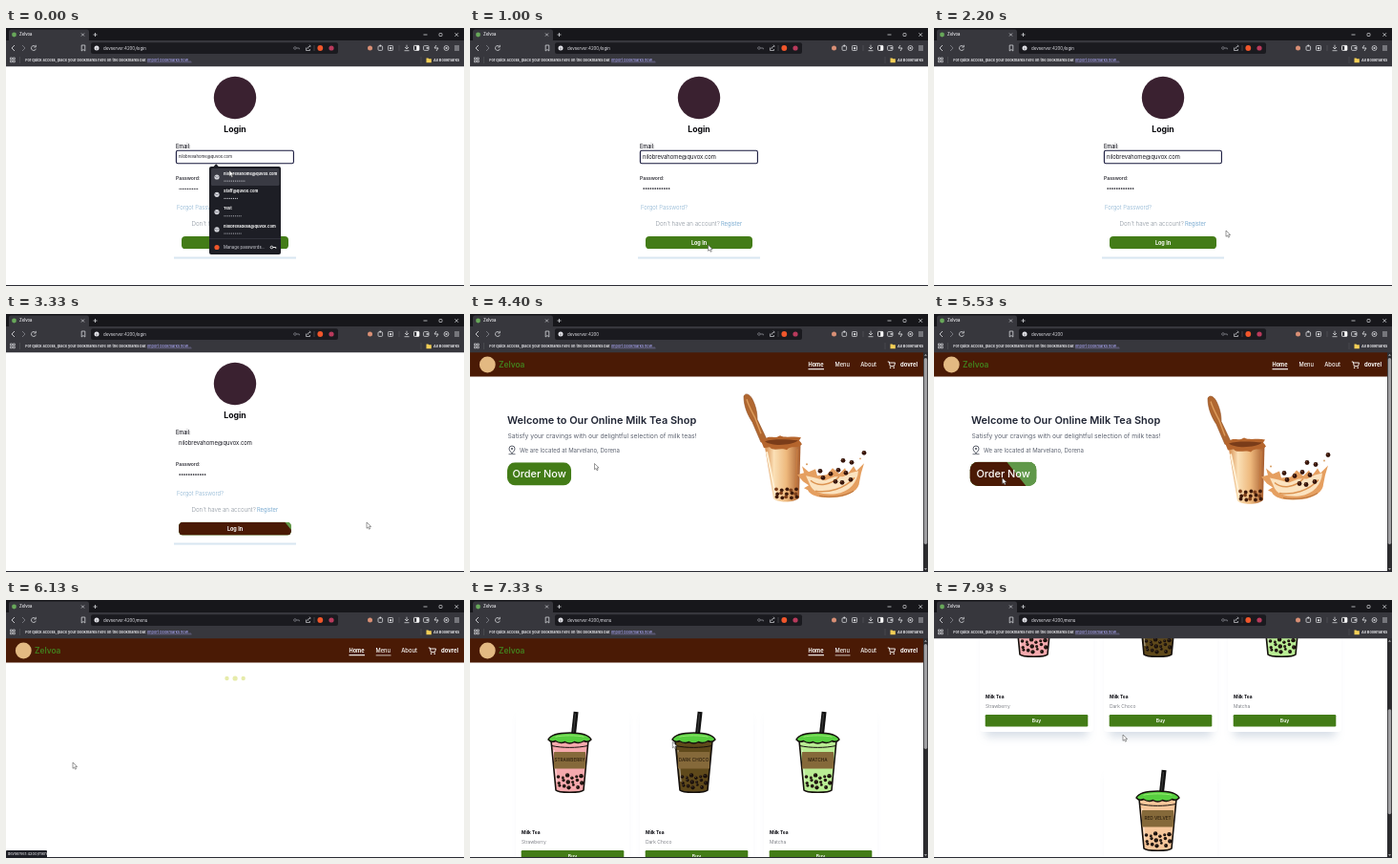
An HTML page with a canvas for the animation above (8000 ms loop, 480 by 270 pixels).

```html
<!DOCTYPE html>
<html lang="en">
<head>
<meta charset="utf-8">
<title>Milk tea shop</title>
<style>
html, body { margin: 0; width: 100%; height: 100%; overflow: hidden; background: #fff; }
canvas { display: block; width: 480px; height: 270px; }
</style>
</head>
<body>
<canvas id="stage"></canvas>
<script>
const LOOP = 8000, HOME_AT = 3670, MENU_AT = 5870, CARDS_AT = 6300;
const BRAND = 'Zelvoa', HOST = 'devserver:4200', USER = 'dovrel';
const EMAIL = 'nilobrevahome@quvox.com';
const GREEN = '#437c17', LIGHT = '#60984a', BROWN = '#4a1a05', INK = '#16161f';
const STRIP = '#17171b', BAR = '#37373d';

const canvas = document.getElementById('stage');
const c = canvas.getContext('2d');
const dpr = window.devicePixelRatio || 1;
canvas.width = 480 * dpr;
canvas.height = 270 * dpr;

const clamp = v => Math.max(0, Math.min(1, v));
const smooth = v => { v = clamp(v); return v * v * (3 - 2 * v); };
const ramp = (t, from, to, d = 300) => smooth((t - from) / d) * (1 - smooth((t - to) / d));

function rect(x, y, w, h, fill, r = 0) {
  c.beginPath();
  c.roundRect(x, y, w, h, r);
  c.fillStyle = fill;
  c.fill();
}

function frame(x, y, w, h, color, r = 0, width = 0.8) {
  c.beginPath();
  c.roundRect(x, y, w, h, r);
  c.strokeStyle = color;
  c.lineWidth = width;
  c.stroke();
}

function dot(x, y, r, fill) {
  c.beginPath();
  c.arc(x, y, r, 0, 7);
  c.fillStyle = fill;
  c.fill();
}

function ring(x, y, r, color, from = 0, to = 7) {
  c.beginPath();
  c.arc(x, y, r, from, to);
  c.strokeStyle = color;
  c.lineWidth = 0.8;
  c.stroke();
}

function line(color, width, ...p) {
  c.beginPath();
  for (let i = 0; i < p.length; i += 2) c.lineTo(p[i], p[i + 1]);
  c.strokeStyle = color;
  c.lineWidth = width;
  c.stroke();
}

function path(d, fill, stroke, width = 1) {
  const p = new Path2D(d);
  if (fill) { c.fillStyle = fill; c.fill(p); }
  if (stroke) { c.strokeStyle = stroke; c.lineWidth = width; c.stroke(p); }
}

function text(s, x, y, size, color, weight = 400, align = 'left') {
  c.font = `${weight} ${size}px Inter, "Open Sans", sans-serif`;
  c.textAlign = align;
  c.textBaseline = 'middle';
  c.fillStyle = color;
  c.fillText(s, x, y);
}

function bullets(x, y, n, gap, r, color) {
  for (let i = 0; i < n; i++) dot(x + i * gap, y, r, color);
}

function keyIcon(x, y, color) {
  ring(x - 1.6, y, 1.3, color);
  line(color, 0.9, x - 0.3, y, x + 2.8, y, x + 2.8, y + 1.3);
}

// Browser window
function browser(url) {
  const pale = '#d5d6da', dim = '#7c7d84';
  rect(0, 0, 480, 14, STRIP);
  rect(3, 1.5, 84, 13, BAR, 2.5);
  rect(0, 13, 480, 27.3, BAR);
  dot(8.5, 7, 2.4, '#68a85a');
  text(BRAND, 14, 7.2, 4.2, '#f0f0f4', 500);
  line(pale, 0.7, 79, 5.5, 82, 8.5);
  line(pale, 0.7, 82, 5.5, 79, 8.5);
  line(pale, 0.8, 91.5, 7, 95.5, 7);
  line(pale, 0.8, 93.5, 5, 93.5, 9);
  line(pale, 0.8, 437.5, 7, 441.5, 7);
  frame(454, 5.5, 3, 3, pale, 0.5, 0.7);
  line(pale, 0.8, 470.5, 5.2, 474, 8.8);
  line(pale, 0.8, 474, 5.2, 470.5, 8.8);

  line(pale, 0.9, 9, 18, 6, 21, 9, 24);
  line(dim, 0.9, 17, 18, 20, 21, 17, 24);
  ring(29, 21, 2.5, pale, 0.3, 5.4);
  line(pale, 0.8, 31.3, 17.8, 31.3, 20, 29.2, 20);
  line(pale, 0.8, 79.2, 18, 82.8, 18, 82.8, 24, 81, 22.5, 79.2, 24, 79.2, 18);
  rect(89, 15.3, 259, 11.6, '#1a1a1f', 2);
  dot(95, 21, 2.5, '#e4e4ea');
  rect(94.7, 20.6, 0.6, 1.8, '#222');
  text(url, 102, 21.2, 4.4, '#e6e6ec');
  keyIcon(304.5, 21, dim);
  line(pale, 0.7, 314.5, 20.5, 314.5, 23.5, 318.5, 23.5, 318.5, 22);
  line(pale, 0.7, 316, 22, 316.5, 20, 319.3, 19, 317.8, 17.8);
  line('#5b5c62', 0.6, 323, 18, 323, 24);
  dot(329.3, 21, 2.9, '#f0562b');
  dot(341, 21, 2.6, '#b93a5c');
  dot(381.5, 21, 2.5, '#d98f75');
  frame(390, 18.8, 4.6, 4.6, pale, 1);
  dot(392.3, 18.4, 1, pale);
  frame(400.5, 18.5, 5, 5, pale, 0.8);
  rect(402, 20.2, 2.2, 2, pale);
  line('#5b5c62', 0.6, 412, 18, 412, 24);
  line(pale, 0.8, 420, 17.7, 420, 22);
  line(pale, 0.8, 418, 20, 420, 22, 422, 20);
  line(pale, 0.8, 417.5, 23.7, 422.5, 23.7);
  frame(427.5, 18.4, 5.4, 5, '#fff', 0.8);
  rect(430.2, 18.4, 2.7, 5, '#fff');
  frame(437.6, 18.6, 5.4, 4.8, pale, 1);
  rect(440.5, 20.2, 2.5, 1.5, pale);
  line(pale, 0.9, 451, 18, 449, 21, 453, 21, 451, 24);
  ring(461.5, 21, 2.5, pale);
  dot(461.5, 21, 1, pale);
  for (const y of [19, 21, 23]) line(pale, 0.8, 470, y, 475, y);

  for (const x of [4.5, 7.4]) for (const y of [31, 33.9]) frame(x, y, 1.9, 1.9, pale, 0, 0.7);
  line('#55565c', 0.6, 14.5, 30, 14.5, 37);
  text('For quick access, place your bookmarks here on the bookmarks bar.', 20.3, 33.6, 3.87, '#f0f0f4', 600);
  text('Import bookmarks now...', 148, 33.6, 3.9, '#a9a5f2', 500);
  line('#a9a5f2', 0.4, 148, 35.8, 194.5, 35.8);
  path('M440.5 31.5h2l.7 .8h2.6v4h-5.3z', '#f4cf56');
  line('#55565c', 0.6, 435, 30, 435, 37);
  text('All Bookmarks', 448, 33.6, 3.9, '#f0f0f4', 600);
}

// Button whose brown layer wipes in from the left along a slanted edge
function wipeButton(x, y, w, h, r, k, grow, label, size, weight) {
  c.save();
  c.translate(x + w / 2, y + h / 2);
  c.scale(1 + grow * k, 1 + grow * k);
  c.translate(-w / 2, -h / 2);
  c.beginPath();
  c.roundRect(0, 0, w, h, r);
  c.clip();
  rect(0, 0, w, h, GREEN);
  if (k > 0) {
    c.globalAlpha = clamp(k * 4);
    rect(0, 0, w, h, LIGHT);
    c.globalAlpha = 1;
    const slant = h * 0.4, edge = k * (w + 2 * slant) - slant;
    path(`M-20 0H${edge - slant}L${edge + slant} ${h}H-20z`, BROWN);
  }
  c.restore();
  text(label, x + w / 2, y + h / 2 + 0.3, size, '#fff', weight, 'center');
}

function dropdown() {
  path('M217 145.5l3.2-3.2 3.2 3.2z', '#1d1e25');
  rect(213, 145, 75, 92, '#1d1e25', 2);
  rect(215, 147, 71.5, 18, '#393a43', 1.5);
  const rows = [[EMAIL, 12], ['Staff@quvox.com', 8], ['Test', 10], ['nilobrevadesk@quvox.com', 10]];
  rows.forEach(([name, n], i) => {
    const y = 152.5 + i * 18.3;
    dot(221, y + 3.5, 2.6, '#d3d4da');
    line('#555763', 0.6, 219, y + 2.6, 221, y + 4, 222.6, y + 3);
    text(name, 228, y, 4.1, '#fff', 700);
    bullets(229, y + 7.6, n, 1.9, 0.55, '#cfd0d8');
  });
  line('#3d3e48', 0.6, 213, 220.5, 288, 220.5);
  dot(221, 229.5, 2.6, '#f0562b');
  text('Manage passwords...', 228, 229.6, 4.3, '#d4d5dc');
  keyIcon(280, 229.5, '#fff');
}

function login(t) {
  dot(240, 73, 22.2, '#3a2130');
  text('Login', 240, 106.5, 8.7, '#08080c', 700, 'center');
  text('Email:', 178, 124.3, 5.5, INK, 500);
  if (t < 2870) frame(178.4, 128.2, 123, 13.6, '#17183c', 1.8, 1.1);
  const filled = t >= 70;
  text(EMAIL, 181, 135.1, filled ? 5.85 : 4.25, INK);
  text('Password:', 178, 157.2, 5.1, INK, 500);
  if (filled) bullets(182.2, 168, 12, 2.4, 0.85, INK);
  else bullets(182, 168.3, 12, 1.7, 0.6, INK);
  text('Forgot Password?', 179, 188, 5.9, '#86b0d0', 300);
  text("Don't have an account?", 194.5, 205, 6.15, '#8b949e', 300);
  text('Register', 263, 205, 5.7, '#78aad0', 400);
  const k = Math.max(ramp(t, 1270, 1750), ramp(t, 2500, 3290));
  wipeButton(184, 218, 112, 13.2, 4, k, 0.054, 'Log In', 5.5, 700);
  const g = c.createLinearGradient(0, 238.5, 0, 242.5);
  g.addColorStop(0, 'rgba(214,228,240,0)');
  g.addColorStop(0.5, '#d9e6f1');
  g.addColorStop(1, 'rgba(214,228,240,0)');
  rect(176, 238.5, 128, 4, g);
  const fade = 1 - smooth((t - 70) / 130);
  if (fade > 0) {
    c.globalAlpha = fade;
    dropdown();
    c.globalAlpha = 1;
  }
}

function nav(shift, menuActive) {
  rect(0, 40, 480, 25.6, BROWN);
  dot(18.3, 53, 8.4, '#e3b982');
  text(BRAND, 30, 53.3, 8.4, '#427f1d', 600);
  c.save();
  c.translate(shift, 0);
  text('Home', 354.5, 53, 5.6, '#fff', 700);
  line('#fff', 1.1, 354.5, 57.7, 371, 57.7);
  text('Menu', 382.5, 53.2, 5.7, '#fff', 500);
  if (menuActive) line('#fff', 0.7, 382.7, 57.9, 398.5, 57.9);
  text('About', 409.2, 53.2, 5.8, '#fff', 500);
  line('#fff', 0.9, 437.8, 50, 439.3, 50, 440.3, 54.6, 444.5, 54.6, 445.5, 51, 439.5, 51);
  dot(440.6, 56.3, 0.8, '#fff');
  dot(444.2, 56.3, 0.8, '#fff');
  text(USER, 451, 53.2, 5.9, '#fff', 700);
  c.restore();
}

function scrollbar(y, h) {
  rect(475, 40, 5, 230, '#2c2c2f');
  rect(475.8, y, 3.4, h, '#a0a0a3', 1.7);
  path('M477.5 41.8l1.5 2h-3z', '#a0a0a3');
  path('M477.5 268l1.5-2h-3z', '#a0a0a3');
}

function drink(dy) {
  c.save();
  c.translate(0, dy);
  const tea = c.createLinearGradient(309, 0, 347, 0);
  tea.addColorStop(0, '#d58b4c');
  tea.addColorStop(0.25, '#fbe0b6');
  tea.addColorStop(0.6, '#edb87c');
  tea.addColorStop(1, '#a4592b');
  // Spoon
  path('M287 85C288 81 293 82 296 88C300 96 301 103 301 109L311 130L305 133L296 112C290 103 287 94 287 85z', '#b06730', '#8d4a1e', 0.6);
  path('M290 88C292 95 296 102 299 108L305 124', null, '#dc9c5c', 1.4);
  // Cup
  path('M308.5 135L346.5 133L345 191C342 196 323 197 318 192z', tea);
  path('M311 143L320 187', null, '#fff0d5', 2);
  path('M343 140L341 186', null, '#c57c42', 1.5);
  path('M304 129L309 130C313 125 319 130 325 126C331 129 339 126 347 128L345 131L348 135C342 141 337 135 332 141C326 138 318 143 314 138L308 139z', '#b5652d');
  path('M309 132C318 129 333 130 344 131C338 136 317 138 309 132z', '#7a3c19');
  for (let i = 0; i < 15; i++) {
    dot(321 + (i % 5) * 5.1 + (i * 7 % 3) * 0.6, 182 + Math.floor(i / 5) * 4 + (i % 2), 1.9, i % 3 ? '#3d1a0b' : '#7d401c');
  }
  // Splash
  path('M343 167L350 165L348 158L355 164L362 161L364 168L374 167L380 160L387 166L393 160L396 166L402 158L405 163L413 155L410 165L408 175C408 181 400 189 385 190.5C370 192 357 190 354 183L350 181L355 178L349 174z', '#e59f60');
  path('M352 168L361 170L372 173L382 169L391 169L399 165L407 163C406 175 398 185 383 187C369 188 360 185 357 179z', '#fbe3c0');
  path('M357 173C365 180 378 178 387 169M362 184C376 186 392 182 403 170', null, '#dc9452', 1.5);
  path('M366 189C378 191 392 190 402 184', null, '#b8733c', 1);
  const pearls = [413, 144, 391, 152, 400, 154, 386, 162, 394, 165, 378, 166, 370, 170, 383, 174, 399, 172, 367, 163, 390, 175];
  for (let i = 0; i < pearls.length; i += 2) {
    dot(pearls[i], pearls[i + 1], 2.4, '#35150b');
    dot(pearls[i] - 0.7, pearls[i + 1] - 0.8, 0.6, '#9b6044');
  }
  dot(409, 150, 0.9, '#d79a5e');
  dot(353, 156, 1, '#d79a5e');
  c.restore();
}

function home(t) {
  nav(0, false);
  text('Welcome to Our Online Milk Tea Shop', 39, 111.5, 10.95, '#1f2433', 600);
  text('Satisfy your cravings with our delightful selection of milk teas!', 39.5, 128.3, 6.77, '#5d6370', 400);
  path('M44 146C41.8 143.3 41 142.2 41 141A3 3 0 0 1 47 141C47 142.2 46.2 143.3 44 146z', null, '#333947', 0.8);
  dot(44, 141, 0.9, '#333947');
  line('#333947', 0.7, 40.5, 146.7, 47.5, 146.7);
  text('We are located at Marvelano, Dorena', 52, 143, 6, '#5d6370');
  const k = Math.max(ramp(t, 4550, 4790), ramp(t, 5350, LOOP));
  wipeButton(39, 155.3, 67.2, 24.2, 8.2, k, 0.06, 'Order Now', 10.9, 500);
  drink(25.5 * (0.5 + 0.5 * Math.cos((t - 5000) / 1400 * 2 * Math.PI)));
  scrollbar(46, 195);
}

const MENU = [
  ['Strawberry', '#f5a9ad', 0, 0],
  ['Dark Choco', '#5f491b', 1, 0],
  ['Matcha', '#b9ec94', 2, 0],
  ['Red Velvet', '#f6c69a', 1, 1]
];

function cup(color, label) {
  path('M6.6 -27L3.6 0', null, '#111', 5);
  path('M6 -25L3.6 -2', null, '#3a3a3a', 1.3);
  path('M-19.5 3L19.5 3L14.5 55C12 58 -12 58 -14.5 55z', color, '#15100c', 1.6);
  path('M-19 8.5C-8 11 8 11 19 8.5', null, '#15100c', 1);
  path('M-22.5 2C-20 -3 -13 -5 0 -5C13 -5 20 -3 22.5 2C20 5 18 5 15 3.5C11 6 8 6 5 4.5C2 6.3 -2 6.3 -5 4.5C-8 6 -11 6 -15 3.5C-18 5 -20 5 -22.5 2z', '#57cf3f', '#15100c', 1.4);
  path('M-15 -0.8C-8 -2.6 8 -2.6 15 -0.8', null, '#9bea74', 1);
  path('M-16.5 13L-13.5 46', null, 'rgba(255,255,255,.5)', 1.2);
  rect(-16.5, 15, 33, 17.5, '#85693a', 0.6);
  text(label.toUpperCase(), 0, 24, 4.7, '#2a1c0c', 500, 'center');
  for (let i = 0; i < 17; i++) {
    const row = Math.floor(i / 6), x = -12 + (i % 6) * 4.8 + row * 0.7;
    const y = 41 + row * 5 + 1.6 * Math.sin(i * 2.4);
    dot(x, y, 1.8 + 0.4 * Math.sin(i * 4.1), '#1a100b');
    dot(x - 0.5, y - 0.6, 0.4, '#a88c7c');
  }
}

function card([name, color, col, row]) {
  c.save();
  c.translate(48 + col * 130, 107 + row * 203);
  c.shadowColor = 'rgba(140,160,185,.36)';
  c.shadowBlur = 10 * dpr;
  c.shadowOffsetY = 5 * dpr;
  rect(6, 12, 107, 161, '#fff', 3);
  c.shadowColor = 'transparent';
  rect(0, 0, 119, 173, '#fff', 3);
  c.save();
  c.translate(56.5, 37);
  cup(color, name);
  c.restore();
  text('Milk Tea', 6, 136.2, 4.8, '#0c0c12', 700);
  text(name, 6, 146.2, 5, '#5c5f67', 300);
  rect(5.7, 155, 107.6, 12.4, GREEN, 1.2);
  text('Buy', 59.5, 161.5, 5, '#fff', 600, 'center');
  c.restore();
}

function menu(t) {
  if (t < CARDS_AT) {
    nav(5, true);
    for (let i = 0; i < 3; i++) {
      dot(231.5 + i * 8.6, 82, 2.2 + 0.4 * Math.sin(t / 130 - i * 1.6), '#e6ebaa');
    }
    return;
  }
  const scroll = 142 * smooth((t - 7450) / 470);
  c.save();
  c.translate(0, -scroll);
  nav(0, true);
  MENU.forEach(card);
  c.restore();
  scrollbar(46 + scroll * 0.48, 110);
}

const PATH = [
  [0, 234, 149], [330, 234, 149], [1070, 250, 229], [1270, 250, 229], [1800, 285, 225],
  [2070, 306, 212], [2350, 306, 212], [2700, 270, 225], [3180, 280, 225], [3330, 378, 218],
  [3870, 378, 218], [4400, 130.5, 156.5], [4600, 90, 168], [4750, 95, 172], [5000, 174.5, 197.5],
  [5500, 72, 172], [5600, 70, 170], [6450, 70, 170], [6730, 225, 155], [7130, 215, 150],
  [7930, 198, 141], [LOOP, 198, 141]
];

function pointer(t) {
  const i = PATH.findIndex(p => p[0] > t);
  const [t0, x0, y0] = PATH[i - 1], [t1, x1, y1] = PATH[i];
  const k = smooth((t - t0) / (t1 - t0));
  c.save();
  c.translate(x0 + (x1 - x0) * k, y0 + (y1 - y0) * k);
  path('M0 0V6.3L1.5 5L2.5 7.2L3.6 6.7L2.7 4.5L4.6 4.4z', '#fff', '#444', 0.55);
  c.restore();
}

function draw() {
  const t = performance.now() % LOOP;
  c.setTransform(dpr, 0, 0, dpr, 0, 0);
  rect(0, 0, 480, 270, '#fff');
  c.save();
  c.beginPath();
  c.rect(0, 40, 480, 230);
  c.clip();
  if (t < HOME_AT) login(t);
  else if (t < MENU_AT) home(t);
  else menu(t);
  c.restore();
  browser(HOST + (t < HOME_AT ? '/login' : t < MENU_AT ? '' : '/menu'));
  rect(0, 269, 480, 1, '#2a2b33');
  if (t > 5600 && t < 6530) {
    rect(0, 262, 43, 8, '#1d1e25', 1);
    text(HOST + '/menu', 1.8, 266.1, 4.1, '#f0f0f4');
  }
  pointer(t);
  requestAnimationFrame(draw);
}
draw();
</script>
</body>
</html>
```
